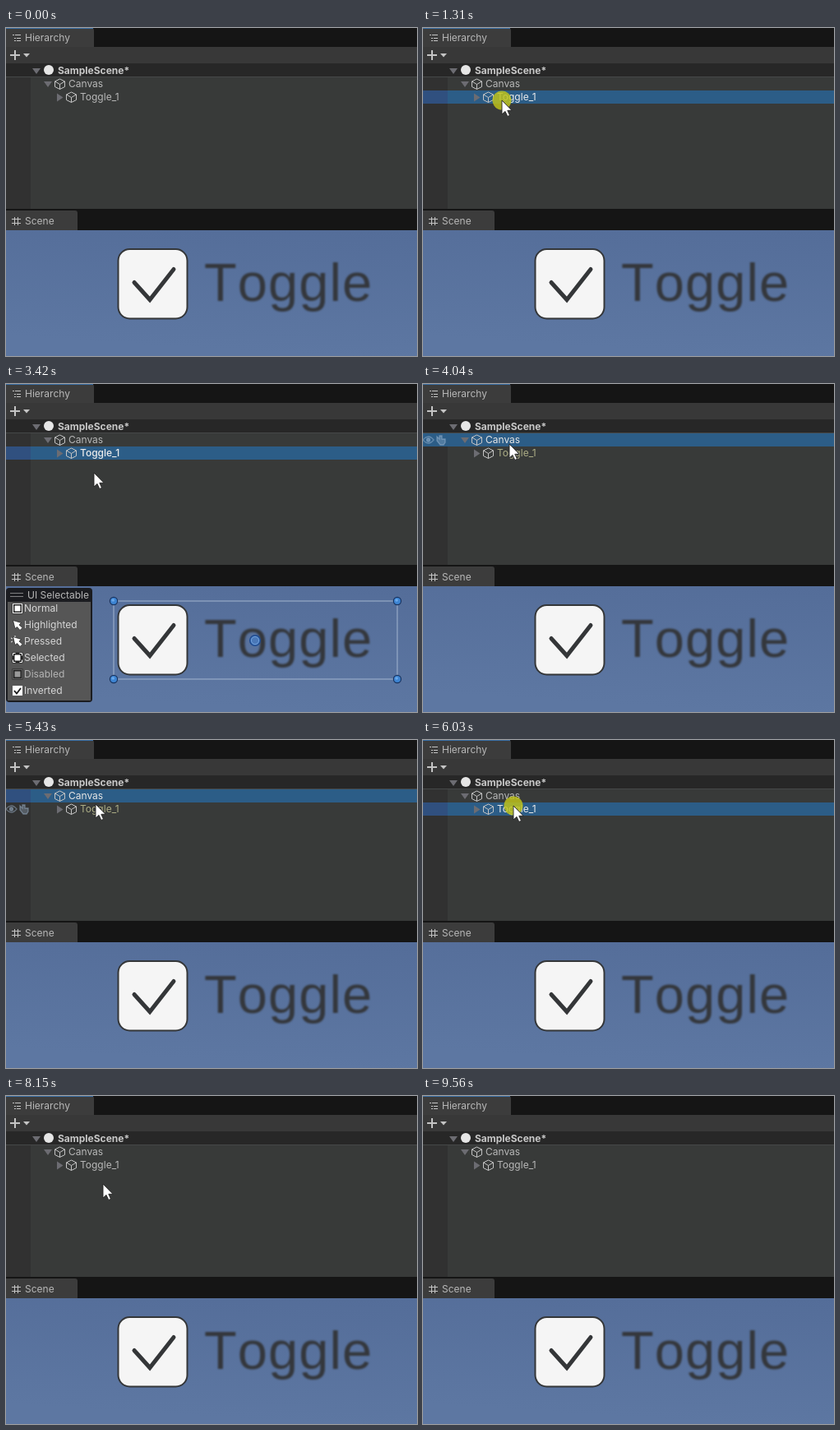
Recreate the animation shown at these times as an HTML page. Size 500 by 399 pixels, loop 9.86 s.

```html
<!DOCTYPE html>
<html lang="en">
<head>
<meta charset="utf-8">
<title>Hierarchy selection</title>
<style>
  html, body { margin: 0; width: 100%; height: 100%; overflow: hidden; background: #151515; }
  svg { display: block; width: 500px; height: 399px; font: 12px Inter, sans-serif; fill: #b8b8b8; }
  .line { fill: none; stroke: #c4c4c4; }
  .fold { fill: #6c6c72; }
  .label { font: 65px "Liberation Sans", Arial, sans-serif; font-kerning: none; letter-spacing: 1.1px; fill: #34373c; filter: blur(1.3px); }
  .soft { filter: blur(.5px); }
</style>
</head>
<body>
<svg viewBox="0 0 500 399">
  <defs>
    <linearGradient id="sky" x1="1" y1="0" x2=".8" y2="1">
      <stop stop-color="#546d99"/><stop offset="1" stop-color="#5d77a2"/>
    </linearGradient>
    <path id="cube" class="line" d="M0-6L6-3V3.500L0 6.500L-6 3.500V-3ZM-6-3L0 .5L6-3M0 .5V6.500"/>
    <path id="pointer" d="M0 0L2.500 10L5 8L8.500 12L11.500 9L7.500 5.500L10 3Z" fill="#fff" stroke="#1c1c1c" stroke-width=".7"/>
    <g id="handle"><circle r="4.600" fill="#3d84d2" stroke="#18335f" stroke-width="1.200"/><circle cx="-.8" cy="-1" r="1.800" fill="#6aa9ea"/></g>
  </defs>

  <!-- Hierarchy -->
  <rect width="500" height="220" fill="#383a39"/>
  <rect y="44" width="30" height="176" fill="#313131"/>
  <rect width="500" height="23" fill="#151515"/>
  <path d="M0 0H104Q107 0 107 3V23H0Z" fill="#3c3c3c"/>
  <rect width="106" height="1" fill="#3a6ea5"/>
  <rect y="23" width="500" height="20" fill="#383838"/>
  <rect y="43" width="500" height="16" fill="#272727"/>
  <rect y="59" width="500" height="1" fill="#464848"/>
  <path class="line" d="M8 8.500H10M11 8.500H18M10 12.500H12M13 12.500H18M10 15.500H12M13 15.500H18"/>
  <text x="23" y="16">Hierarchy</text>
  <path class="line" stroke-width="2" d="M5 33H17M11 27V39"/>
  <path d="M21 31H29L25 35.500Z" fill="#c4c4c4"/>

  <g id="row">
    <rect width="500" height="16" fill="#2c5d87"/>
    <rect id="gutter" width="30" height="16" fill="#30507f"/>
  </g>
  <g id="eyes" fill="none" stroke="#a9c0dc" stroke-opacity=".45" stroke-width="1.300">
    <path d="M0 8Q6.500 0 13 8Q6.500 16 0 8Z"/>
    <circle cx="6.500" cy="8" r="2" fill="#a9c0dc" fill-opacity=".45"/>
    <path d="M17 4L20 7V3H23V7H27V11L25 14H21L17 9Z" fill="#a9c0dc" fill-opacity=".3"/>
  </g>

  <path class="fold" d="M32 49H42L37 56ZM46 65H56L51 72ZM62 79.500L69.500 84.500L62 89.500Z"/>
  <circle cx="52" cy="51" r="6" fill="#e6e6e6"/>
  <text x="63" y="55.500" font-weight="700" fill="#c8c8c8">SampleScene*</text>
  <use href="#cube" x="65.500" y="68"/>
  <text id="canvasName" x="76" y="72">Canvas</text>
  <use href="#cube" x="79.500" y="84"/>
  <text id="toggleName" x="90" y="88">Toggle_1</text>

  <!-- Scene -->
  <rect y="220" width="500" height="26" fill="#151515"/>
  <path d="M0 222H84Q87 222 87 225V246H0Z" fill="#3c3c3c"/>
  <path class="line" d="M10.500 230V240M14.500 230V240M7 232.500H18M7 237.500H18"/>
  <text x="23" y="239">Scene</text>
  <rect y="246" width="500" height="153" fill="url(#sky)"/>
  <g class="soft" stroke="#343638">
    <rect x="136.500" y="269" width="84" height="84.500" rx="14" fill="#f5f5f5" stroke-width="2"/>
    <path d="M156 309.500L175 330.500L204 293.500" fill="none" stroke-width="5" stroke-linecap="round"/>
  </g>
  <text class="label" x="241" y="332">Toggle</text>

  <g id="gizmo">
    <rect x="131" y="264" width="345" height="95" fill="none" stroke="#a3b5d0"/>
    <use href="#handle" x="131" y="264"/><use href="#handle" x="476" y="264"/>
    <use href="#handle" x="131" y="359"/><use href="#handle" x="476" y="359"/>
    <circle cx="303" cy="312" r="6.300" fill="#4a78b8" stroke="#1f4b90" stroke-width="1.500"/>
    <circle cx="303" cy="312" r="4.600" fill="none" stroke="#6ea0de"/>

    <rect y="248" width="105" height="139" rx="4" fill="#1b1c20"/>
    <rect x="2" y="265" width="101" height="120" fill="#565656"/>
    <path class="line" stroke-opacity=".6" d="M5 254.500H21M5 258.500H21"/>
    <text x="26" y="261">UI Selectable</text>
    <g id="options" fill="#d6d6d6"></g>
  </g>

  <circle id="press" r="11.500" fill="#bfc21a" fill-opacity=".84"/>
  <path id="cursor" d="M0 0V17L4 13.400L6.800 19.500L9.500 18.300L6.800 12.300H12Z" fill="#fff" stroke="#222" stroke-width=".9"/>
</svg>
<script>
const LOOP = 9860, STEP = 100;
const el = id => document.getElementById(id);
const show = (id, on) => el(id).setAttribute('visibility', on ? 'visible' : 'hidden');
const move = (id, x, y) => el(id).setAttribute('transform', `translate(${x} ${y})`);
const ease = p => p * p * (3 - 2 * p);

// Pointer glides: start, end, destination
const entry = [248, 227];
const glides = [
  [210, 830, 96, 88],
  [2520, 3020, 107, 112],
  [3320, 3830, 105, 73],
  [5230, 5530, 110, 80],
  [6250, 6750, 115, 98],
  [6850, 7670, 118, 107],
  [8860, 9560, 430, 399]
];

// The pointer is sampled about ten times a second
function pointerAt(t) {
  let [x, y] = entry;
  for (const [start, end, toX, toY] of glides) {
    if (t < start) break;
    const steps = Math.round((end - start) / STEP);
    const p = Math.min(1, Math.floor((t - start + 5) / (end - start) * steps) / steps);
    x += (toX - x) * ease(p);
    y += (toY - y) * ease(p);
  }
  return [Math.round(x), Math.round(y)];
}

const square = (inset, fill, extra = '') =>
  `<rect x="${7.5 + inset}" y="${-6.5 + inset}" width="${13 - 2 * inset}" height="${13 - 2 * inset}" fill="${fill}" ${extra}/>`;
const framed = (color, dash) => square(0, '#222') +
  square(1, 'none', `stroke="${color}" stroke-dasharray="${dash}"`) + square(3, color);
const arrow = '<use href="#pointer" x="8.500" y="-5.500"/>';
const icons = {
  Normal: framed('#fff', 'none'),
  Highlighted: arrow,
  Pressed: arrow + '<path d="M6-4L8-3M11-7V-5M6 1L8 0" stroke="#eee"/>',
  Selected: framed('#fff', '3 5 3 0'),
  Disabled: framed('#999', '1 1'),
  Inverted: square(.5, '#fff') + '<path d="M10 0L13 3.500L18-3" fill="none" stroke="#1c1c1c" stroke-width="1.800"/>'
};
el('options').innerHTML = Object.entries(icons).map(([name, icon], i) =>
  `<g transform="translate(0 ${273 + 20 * i})">${icon}<text x="22" y="4"
    ${name === 'Disabled' ? 'fill="#b4b4b4"' : ''}>${name}</text></g>`).join('');

function style(id, color, weight = 400) {
  el(id).style.fill = color;
  el(id).style.fontWeight = weight;
}

function draw(t) {
  const within = (start, end) => t >= start && t < end;
  const [x, y] = pointerAt(t);
  const visible = within(310, 9560);
  const pressed = within(1210, 1510) || within(3930, 4040) || within(6030, 6130);
  const gizmo = within(1510, 4040) || within(6130, 8150);
  const canvas = within(3930, 6030);
  const toggle = within(1310, 8150) && !canvas;
  const selected = toggle ? 76 : canvas ? 60 : 0;
  const hovered = visible && !pressed && y >= 60 && y < 92 ? (y < 76 ? 60 : 76) : 0;

  show('cursor', visible);
  move('cursor', x, y);
  show('press', pressed);
  move('press', x, y);
  show('gizmo', gizmo);
  show('row', selected);
  move('row', 0, selected);
  show('gutter', selected && hovered !== selected);
  show('eyes', hovered);
  move('eyes', 0, hovered);
  style('canvasName', canvas ? '#e6e6e6' : '');
  style('toggleName', toggle ? '#ececec' : canvas ? '#adae86' : '', toggle && gizmo ? 500 : 400);
}

function tick() {
  draw(performance.now() % LOOP);
  requestAnimationFrame(tick);
}
tick();
</script>
</body>
</html>
```
